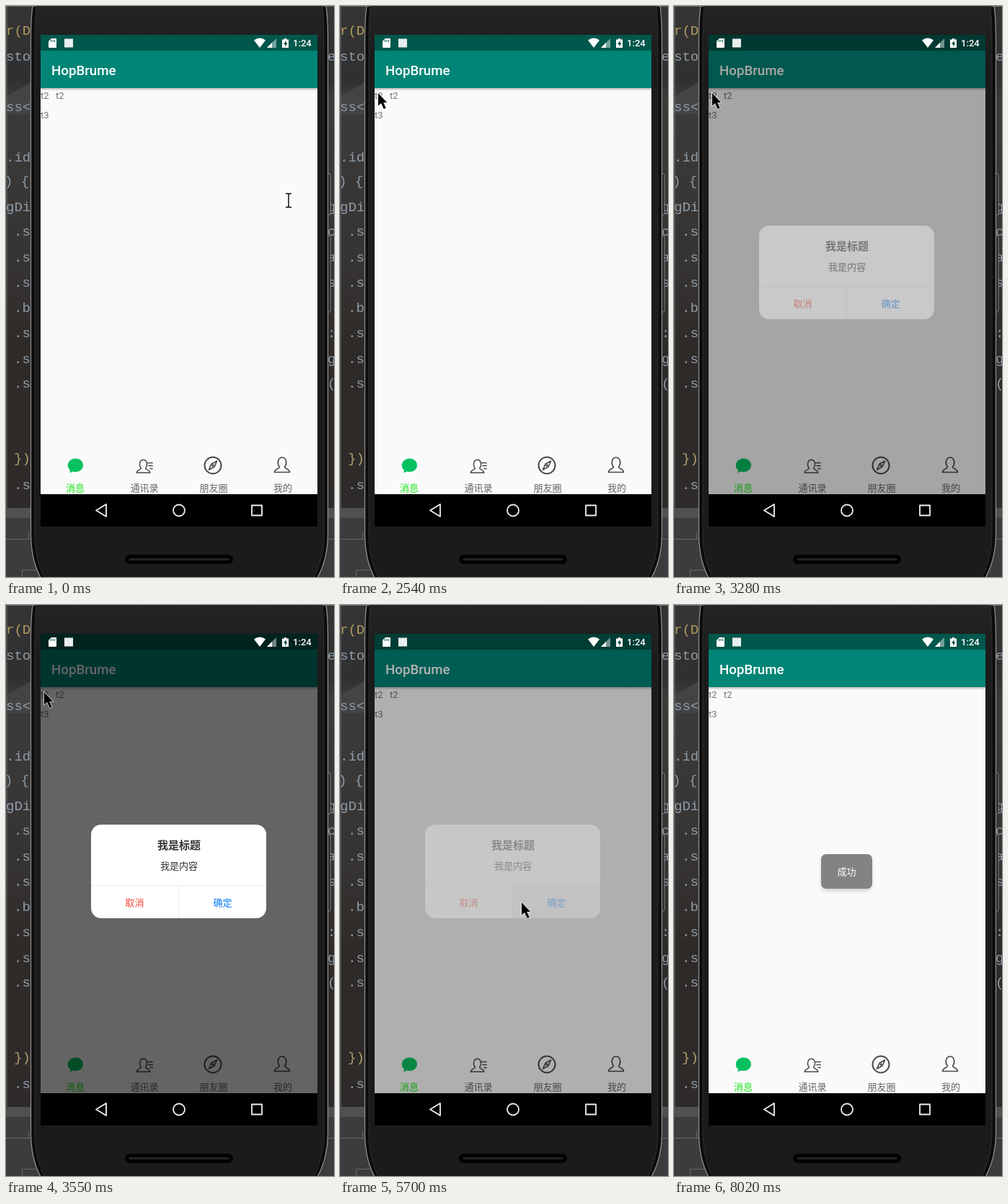
Write an HTML page that moves like this. It is 455 px wide and 793 px high and loops after 8120 ms.

```html
<!DOCTYPE html>
<html lang="zh">
<head>
<meta charset="utf-8">
<style>
  html, body { margin: 0; width: 100%; height: 100%; overflow: hidden; background: #2e2e2e; }
  svg { display: block; width: 100%; height: 100%; }
  text { font: 13.07px Roboto, "Noto Sans CJK SC", "Noto Sans CJK", sans-serif; }
  .mid { text-anchor: middle; }
  .code text { font: 19px "Liberation Mono", monospace; fill: #8e9ca8; white-space: pre; }
  .line { fill: none; stroke: #4a4a4a; stroke-width: 1.7; stroke-linejoin: round; stroke-linecap: round; }
</style>
</head>
<body>
<svg viewBox="0 0 455 793" preserveAspectRatio="none">
  <defs>
    <linearGradient id="wall" x2="0" y2="1">
      <stop offset="0" stop-color="#343434"/>
      <stop offset=".13" stop-color="#303030"/>
      <stop offset=".16" stop-color="#3c3b3a"/>
      <stop offset=".45" stop-color="#363433"/>
      <stop offset=".6" stop-color="#2e2a28"/>
      <stop offset="1" stop-color="#2d2b2a"/>
    </linearGradient>
    <linearGradient id="body" x2="0" y2="1">
      <stop offset="0" stop-color="#242424"/>
      <stop offset=".1" stop-color="#1b1b1b"/>
      <stop offset="1" stop-color="#1b1b1b"/>
    </linearGradient>
    <linearGradient id="drop" x2="0" y2="1">
      <stop offset="0" stop-opacity=".25"/>
      <stop offset="1" stop-opacity="0"/>
    </linearGradient>
    <filter id="blur" x="-30%" y="-30%" width="160%" height="160%"><feGaussianBlur stdDeviation="3"/></filter>
    <path id="person" d="M-3.5 2.5C-7-1-6.500-10.500 0-10.500S7-1 3.500 2.500C3 5 10.500 5 10.500 10H-10.500C-10.500 5-3 5-3.500 2.500Z"/>
  </defs>

  <!-- editor behind the phone -->
  <rect width="455" height="793" fill="url(#wall)"/>
  <path d="M0 126L34 106V150H0Z" fill="#444"/>
  <rect y="697" width="455" height="14" fill="#505050"/>
  <rect y="711" width="455" height="82" fill="#3a3c3e"/>
  <path d="M0 .5H455M1 0V697M0 740.500H455M31.500 731V740M22.500 793V783.500H60" fill="none" stroke="#66686a"/>
  <g class="code" id="code"></g>

  <!-- phone -->
  <rect x="444" y="233" width="6" height="57" rx="2" fill="#222" stroke="#888"/>
  <rect x="444" y="319" width="6" height="106" rx="2" fill="#222" stroke="#888"/>
  <path d="M37 0C34 20 34.500 40 34.500 60V735C34.500 760 41 785 52 800H428C439 785 446.500 760 446.500 735V60C446.500 40 447 20 444 0Z"
        fill="#0c0c0c" stroke="#8d8d8d" stroke-width="1.3"/>
  <path d="M42 0C40 20 40 40 40 60V735C40 760 47 785 57 800H423C433 785 441 760 441 735V60C441 40 441 20 439 0Z"
        fill="url(#body)" stroke="#303030"/>
  <rect x="165" y="762" width="150" height="13" rx="6.500" fill="#020202"/>
  <path d="M172 768.500H308" stroke="#242424" stroke-width="3" stroke-linecap="round"/>

  <!-- app -->
  <rect x="48" y="40" width="384" height="683" fill="#fafafa"/>
  <rect x="48" y="114" width="384" height="4" fill="url(#drop)"/>
  <rect x="48" y="40" width="384" height="22" fill="#00574b"/>
  <rect x="48" y="62" width="384" height="52" fill="#008577"/>
  <text x="63" y="95.500" fill="#fff" style="font-size:18.7px;font-weight:500">HopBrume</text>
  <g fill="#757575">
    <text x="48" y="128.500">t2</text><text x="69" y="128.500">t2</text><text x="48" y="155.500">t3</text>
  </g>
  <g class="mid" fill="#666">
    <text x="96" y="674" fill="#14e614">消息</text>
    <text x="192" y="674">通讯录</text>
    <text x="288" y="674">朋友圈</text>
    <text x="384" y="674">我的</text>
  </g>
  <path d="M96.500 628.500C110.500 628.500 110.500 647 96.500 647C95 647 93.500 646.800 92.500 646.500L88.500 648.500L89 644.500C82.500 639 86.500 628.500 96.500 628.500Z" fill="#07c160"/>
  <g class="line">
    <use href="#person" transform="translate(190.500 639.500) scale(.88)"/>
    <path d="M196.500 634.500H203M198 638.500H203M200 642.500H203"/>
    <circle cx="287" cy="638" r="11.500" stroke-width="2"/>
    <path d="M292.500 632L289 640L281.500 644L285 636Z"/>
    <circle cx="287" cy="638" r=".8"/>
    <use href="#person" x="383" y="637.500"/>
  </g>
  <rect id="dim" x="48" y="40" width="384" height="638"/>

  <!-- status and navigation bars -->
  <g fill="#fff">
    <path d="M63 45H69Q70 45 70 46V57Q70 58 69 58H60Q59 58 59 57V49Z"/>
    <path d="M62.500 47V50M65 47V50M67.500 47V50" stroke="#00574b"/>
    <rect x="81" y="45.500" width="12" height="12" fill="#e8efee"/>
    <path d="M344 47.500Q352 41.500 360 47.500L352 58Z"/>
    <path d="M375 45V58H362Z" opacity=".45"/>
    <path d="M369 51V58H362Z"/>
    <path d="M386 45H389V46.500H392V58H383V46.500H386Z"/>
    <path d="M388.500 48L385 53H387.200V56.500L390.500 51.500H388.500Z" fill="#00453b"/>
    <text x="398" y="56" font-weight="500" style="font-weight:500">1:24</text>
  </g>
  <rect x="48" y="678" width="384" height="45"/>
  <g fill="none" stroke="#f0f0f0" stroke-width="1.800" stroke-linejoin="round">
    <path d="M139 692V709L125 700.500Z"/>
    <circle cx="240" cy="700.500" r="8"/>
    <rect x="341" y="693.500" width="14" height="14"/>
  </g>

  <g id="dialog" class="mid">
    <rect x="118" y="305" width="243" height="130" rx="14" fill="#fff"/>
    <path id="pressed" d="M239.500 389.500H361V421A14 14 0 0 1 347 435H239.500Z" fill="#f0f0f0"/>
    <path d="M118 389.500H361M239.500 390V435" stroke="#e9e9e9"/>
    <text x="240" y="339" fill="#333" style="font-size:15px;font-weight:700">我是标题</text>
    <text x="240" y="367" fill="#333">我是内容</text>
    <text x="178.500" y="418" fill="#f8433a">取消</text>
    <text x="300.500" y="418" fill="#087dfb">确定</text>
  </g>

  <g id="toast" class="mid">
    <rect x="205" y="350" width="69" height="47" rx="7" opacity=".22" filter="url(#blur)"/>
    <rect x="204" y="346" width="71" height="48" rx="7" fill="#666"/>
    <text x="239.500" y="375" fill="#fff">成功</text>
  </g>

  <path id="beam" d="M-4-9.500H-1L0-8.500L1-9.500H4M0-8.500V8.500M-4 9.500H-1L0 8.500L1 9.500H4" fill="none" stroke="#000" stroke-width="1.400"/>
  <path id="arrow" d="M0 0V17.500L4 14L7.700 22L10.700 20.700L7.200 13H12.200Z" stroke="#fff" stroke-width="1.200" paint-order="stroke"/>
</svg>
<script>
const LOOP = 8120;
const $ = id => document.getElementById(id);

const leftCode = [
  [40, 0, 'r(D', '#b39a62'], [76, 0, 'sto'], [146, 0, 'ss<'], [216, 0, '.id'], [249, -2, ') {'],
  [285, 0, 'gDi'], [319, 11, '.s'], [355, 11, '.s'], [390, 11, '.s'], [425, 11, '.b'],
  [460, 11, '.s'], [496, 11, '.s'], [530, 11, '.s'], [634, 11, '})', '#b3a170'], [671, 11, '.s']
];
const rightCode = [[76, 'e'], [285, 'g'], [319, 'c'], [355, 'a'], [390, 's'], [460, ':'], [496, 'g'], [530, '(']];
const codeLine = (y, x, text, color = '#8e9ca8') =>
  `<text x="${x}" y="${y}" style="fill:${color}">${text.replace('<', '&lt;')}</text>`;
$('code').innerHTML = leftCode.map(line => codeLine(...line)).join('') +
  rightCode.map(([y, char]) => codeLine(y, 446, char)).join('');

// Each move: first change, last change, number of steps, waypoints.
const moves = [
  [250, 400, 2, [[392, 270], [387, 280]]],
  [680, 1650, 8, [[387, 280], [400, 286], [436, 296], [390, 296], [345, 297], [308, 376], [250, 345], [205, 310], [172, 296]]],
  [1770, 2540, 7, [[172, 296], [53, 121]]],
  [4050, 5000, 8, [[53, 121], [116, 172], [174, 253], [235, 417]]],
  [5120, 5420, 3, [[235, 417], [232, 416], [245, 410], [252, 413]]],
  [6490, 7030, 5, [[252, 413], [288, 468], [330, 640], [355, 772]]],
  [7150, 7310, 2, [[355, 772], [352, 782], [352, 830]]]
];

function along(points, u) {
  const s = u * (points.length - 1);
  const i = Math.min(Math.floor(s), points.length - 2);
  return points[i].map((a, axis) => a + (points[i + 1][axis] - a) * (s - i));
}

function pointer(t) {
  let place = moves[0][3][0];
  for (const [start, end, steps, points] of moves) {
    if (t < start) break;
    const step = Math.floor((t - start) / (end - start) * (steps - 1) + 1e-6) + 1;
    place = along(points, Math.min(1, step / steps));
  }
  return place;
}

// Value of the latest [time, value] pair reached.
const held = (t, pairs) => pairs.reduce((value, [time, next]) => t >= time ? next : value, 0);
const dimSteps = [[3160, .12], [3280, .34], [3420, .52], [3550, .6], [5700, .3], [5820, 0]];
const dialogSteps = [[3280, .4], [3420, .85], [3550, 1], [5700, .3], [5820, 0]];
const toastSteps = [[6090, .4], [6220, .8], [6340, 1], [8020, .8]];

function draw() {
  const t = performance.now() % LOOP;
  const isBeam = t < 680;
  const at = `translate(${pointer(t).map(Math.round)})`;
  $('beam').setAttribute('transform', at);
  $('arrow').setAttribute('transform', at);
  $('beam').setAttribute('opacity', +isBeam);
  $('arrow').setAttribute('opacity', +!isBeam);
  $('dim').setAttribute('opacity', held(t, dimSteps));
  $('dialog').setAttribute('opacity', held(t, dialogSteps));
  $('pressed').setAttribute('opacity', +(t >= 5420));
  $('toast').setAttribute('opacity', held(t, toastSteps));
  requestAnimationFrame(draw);
}
draw();
</script>
</body>
</html>
```
